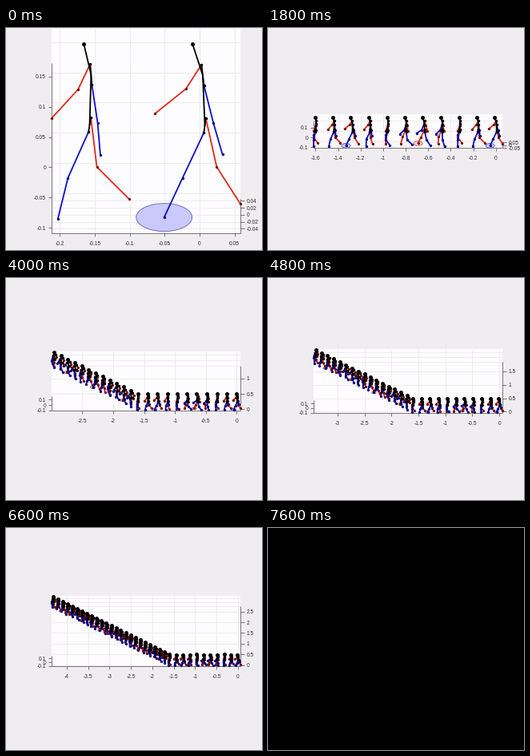
A matplotlib script that plays this animation: 320x278 px, repeating every 7.8 s.

```python
import math
import numpy as np
import matplotlib
matplotlib.rcParams["toolbar"] = "None"
import matplotlib.pyplot as plt
from matplotlib.animation import FuncAnimation
from matplotlib.patches import Rectangle

W, H, DPI = 320, 278, 100
FRAMES, STEP_MS = 39, 200
PT = 72 / DPI

BG, WALL, GRID, AXIS = "#efedf0", "#fdfcfe", "#ebe6ec", "#5a5a5a"
RED, BLUE = "#e22a18", "#0d0dc8"
RED_DOT, BLUE_DOT = "#6e1008", "#06067c"

LEFT, RIGHT, MID_Y = 57, 293, 129
Y_MIN, Y_MAX = -0.109, 0.172
SIN_EL, COS_EL = math.sin(math.radians(60)), 0.5

# Walk: straight, then 45 degrees, then 90 degrees
STRIDE, TURN_1, TURN_2 = 0.1598, 10, 34
# Segment angles in degrees over one gait cycle of eight poses
THIGH = [22, 21, 10, -3, -11, -6, 12, 23]
SHIN = [22, 12, 0, -14, -29, -41, -32, 2]
THIGH_LEN, SHIN_LEN = 0.082, 0.070
UPPER_LEN, FORE_LEN = 0.054, 0.058
REACH = 0.04


def heading(n):
    return math.radians(0 if n <= TURN_1 else 45 if n <= TURN_2 else 90)


def swing(joint, length, degrees, side):
    """Next joint of a limb; coordinates are forward, up, sideways."""
    a = math.radians(degrees)
    return (joint[0] + length * math.sin(a),
            joint[1] - length * math.cos(a), side)


def local_pose(n):
    phase = n * math.pi / 4
    c, c2 = math.cos(phase), math.cos(2 * phase)
    bob = 0.001 * (1 - c2)
    root = -0.0025 - 0.005 * c2
    chest = root - 0.002 + 0.005 * c2
    head = (root + 0.0085 + 0.009 * c2, 0.173 + bob, 0)
    pose = {"head": head}
    for name, s in (("red", 1), ("blue", -1)):
        i = n % 8 if s < 0 else (n + 4) % 8
        hip = (root - s * 0.0017 * math.cos(phase - 0.7), 0.039 + bob, s * 0.021)
        knee = swing(hip, THIGH_LEN, THIGH[i], s * 0.02)
        foot = swing(knee, SHIN_LEN, SHIN[i], s * 0.02)
        shoulder = (chest + s * 0.0018 * c, 0.122 + bob, s * 0.03)
        elbow = swing(shoulder, UPPER_LEN, 5 + 19.3 * s * c, s * 0.046)
        hand = swing(elbow, FORE_LEN, 18.5 + 31.6 * s * c, s * 0.039)
        pose[name + "_leg"] = (hip, knee, foot)
        pose[name + "_arm"] = (shoulder, elbow, hand)
    return pose


def place(points, n, pos):
    """Turn forward/up/side points into world x, y, z."""
    p = np.atleast_2d(np.array(points, float))
    a = heading(n)
    x = pos[0] - p[:, 0] * math.cos(a) + p[:, 2] * math.sin(a)
    z = pos[1] + p[:, 0] * math.sin(a) + p[:, 2] * math.cos(a)
    return np.column_stack([x, p[:, 1], z])


def build_walkers(count):
    walkers, pos = [], np.zeros(2)
    for n in range(count):
        if n:
            a = heading(n)
            pos = pos + STRIDE * np.array([-math.cos(a), math.sin(a)])
        walker = {k: place(v, n, pos) for k, v in local_pose(n).items()}
        if n % 4 == 0:
            side = "red" if n % 8 else "blue"
            t = np.linspace(0, 2 * math.pi, 60)
            foot = walker[side + "_leg"][2]
            ring = np.column_stack([REACH * np.cos(t), 0 * t, REACH * np.sin(t)])
            walker["ring"] = foot + ring
            walker["ring_side"] = side
        walker["all"] = np.vstack([v for v in walker.values()
                                   if isinstance(v, np.ndarray)])
        walkers.append(walker)
    return walkers


def walkers_at(k):
    t = max(k, 1) - 1
    return int(2.65 + 1.156 * t - 0.0039 * t * t)


def nice_step(span, most):
    for power in range(-3, 2):
        for m in (1, 2, 5):
            step = m * 10.0 ** power
            if span / step <= most:
                return step
    return 100.0


def ticks(lo, hi, step):
    first, last = math.ceil(lo / step - 1e-6), math.floor(hi / step + 1e-6)
    return [round(i * step, 4) for i in range(first, last + 1)]


class View:
    """Parallel projection fitted to the fixed plot width."""

    def __init__(self, walkers):
        pts = np.vstack([w["all"] for w in walkers])
        self.x0, self.x1 = pts[:, 0].min(), pts[:, 0].max()
        self.z0 = -0.053
        self.z1 = max(0.044 if len(walkers) < 5 else 0.07, pts[:, 2].max())
        self.scale = (RIGHT - LEFT) / (self.x1 - self.x0)
        rise = SIN_EL * (Y_MAX - Y_MIN) + COS_EL * (self.z1 - self.z0)
        self.top = MID_Y - self.scale * rise / 2
        self.bottom = MID_Y + self.scale * rise / 2

    def px(self, x):
        return LEFT + self.scale * (x - self.x0)

    def py(self, y, z):
        rise = SIN_EL * (y - Y_MIN) + COS_EL * (z - self.z0)
        return self.bottom - self.scale * rise

    def points(self, p):
        return self.px(p[:, 0]), self.py(p[:, 1], p[:, 2])


fig = plt.figure(figsize=(W / DPI, H / DPI), dpi=DPI, facecolor=BG)
ax = fig.add_axes([0, 0, 1, 1])
WALKERS = build_walkers(walkers_at(FRAMES - 2))


def line(xs, ys, color=AXIS, width=0.8, z=1):
    ax.plot(xs, ys, color=color, lw=width * PT, zorder=z, solid_capstyle="butt")


def label(x, y, value, align):
    ax.text(x, y, f"{value:g}", ha=align, va="center_baseline",
            family="Liberation Sans", fontsize=6.6 * PT, color="#303030")


def draw_axes(v):
    ax.add_patch(Rectangle((LEFT, v.top), RIGHT - LEFT, v.bottom - v.top,
                           fc=WALL, ec="none", zorder=0))
    for x in ticks(v.x0, v.x1, nice_step(v.x1 - v.x0, 9)):
        p = v.px(x)
        line([p, p], [v.top, v.bottom], GRID)
        line([p, p], [v.bottom, v.bottom + 4])
        label(p, v.bottom + 12.5, x, "center")
    for y in ticks(Y_MIN, Y_MAX, 0.05 if v.scale > 400 else 0.1):
        back, front = v.py(y, v.z1), v.py(y, v.z0)
        line([LEFT, RIGHT], [back, back], GRID)
        line([LEFT - 4, LEFT], [front, front])
        label(50, front, y, "right")
    for z in ticks(v.z0, v.z1, nice_step(v.z1 - v.z0, 5.9)):
        p = v.py(Y_MIN, z)
        line([LEFT, RIGHT], [p, p], GRID)
        line([RIGHT, RIGHT + 5], [p, p])
        label(300.5, p, z, "left")
    line([LEFT, RIGHT], [v.bottom, v.bottom])
    line([LEFT, LEFT], [v.py(Y_MAX, v.z0), v.bottom])
    line([RIGHT, RIGHT], [v.py(Y_MIN, v.z1), v.bottom])


def limbs(v, parts, color, dot, z):
    gap = np.full((1, 3), np.nan)
    x, y = v.points(np.vstack([np.vstack([p, gap]) for p in parts]))
    ax.plot(x, y, color=color, lw=1.8 * PT, marker="o", ms=3.3 * PT,
            mfc=dot, mec="none", zorder=z)


def draw_walker(v, w, z):
    if "ring" in w:
        blue = w["ring_side"] == "blue"
        ax.fill(*v.points(w["ring"]), fc="#c9c9fb" if blue else "#fbcfc9",
                ec="#5a5aa8" if blue else "#b0625a", lw=0.8 * PT, zorder=2)
    red_sh, blue_sh = w["red_arm"][:1], w["blue_arm"][:1]
    red_hip, blue_hip = w["red_leg"][:1], w["blue_leg"][:1]
    neck, pelvis = (red_sh + blue_sh) / 2, (red_hip + blue_hip) / 2
    limbs(v, [w["red_leg"], w["red_arm"]], RED, RED_DOT, z)
    limbs(v, [w["blue_leg"], w["blue_arm"]], BLUE, BLUE_DOT, z + 0.1)
    limbs(v, [np.vstack([red_sh, blue_sh]), np.vstack([red_hip, blue_hip])],
          "black", "black", z + 0.2)
    x, y = v.points(np.vstack([w["head"], neck, pelvis]))
    ax.plot(x, y, color="black", lw=1.8 * PT, zorder=z + 0.2)
    ax.plot(x[:1], y[:1], "o", color="black", ms=5 * PT, mec="none",
            zorder=z + 0.3)


def draw(k):
    ax.cla()
    ax.set_xlim(0, W)
    ax.set_ylim(H, 0)
    ax.axis("off")
    if k == FRAMES - 1:
        ax.add_patch(Rectangle((-1, -1), W + 2, H + 2, fc="black", ec="none"))
        return []
    shown = WALKERS[:walkers_at(k)]
    view = View(shown)
    draw_axes(view)
    for i, w in enumerate(shown):
        draw_walker(view, w, 3 + i)
    return []


anim = FuncAnimation(fig, draw, frames=FRAMES, init_func=lambda: [],
                     interval=STEP_MS, repeat=True, repeat_delay=0, blit=False)
plt.show()
```
